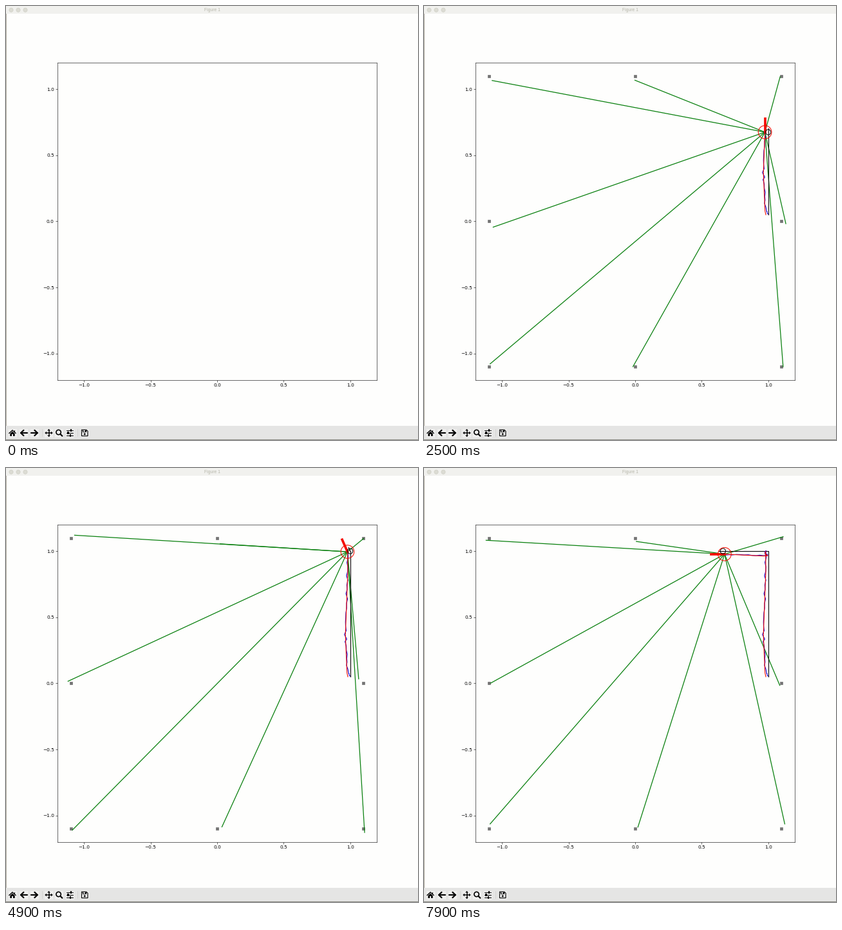
A matplotlib script that plays this animation: 640x674 px, repeating every 8 s.

```python
import matplotlib.pyplot as plt
import numpy as np
from matplotlib.animation import FuncAnimation
from matplotlib.collections import LineCollection
from matplotlib.patches import Circle, Ellipse, Polygon, Rectangle

W, H, DPI = 640, 674, 64
FRAMES, INTERVAL = 80, 100

PAPER, TITLE_BAR, TOOLBAR, CELL = "#fefefd", "#f1f1ee", "#e5e5e4", "#f0f0ef"
INK, GREEN, RED, BLUE = "#060606", "#0a800f", "#f50a00", "#1000d0"


def px(size):
    """Pixels to points."""
    return size * 72 / DPI


def pt(size):
    """Points of the 12 inch window content to points of this figure."""
    return size * 5 / 6


plt.rcParams["font.family"] = "DejaVu Sans"
fig = plt.figure(figsize=(W / DPI, H / DPI), dpi=DPI, facecolor=PAPER)


# Window frame and toolbar, in pixels with y pointing down
ui = fig.add_axes([0, 0, 1, 1])
ui.set(xlim=(0, W), ylim=(H, 0))
ui.axis("off")


def box(x0, y0, x1, y1, color=INK):
    ui.add_patch(Rectangle((x0, y0), x1 - x0, y1 - y0, fc=color, ec="none"))


def stroke(points, width, color=INK):
    x, y = zip(*points)
    ui.plot(x, y, color=color, lw=px(width), solid_capstyle="round",
            solid_joinstyle="round")


def shape(points):
    ui.add_patch(Polygon(points, fc=INK, ec="none"))


def disc(x, y, r, fill, edge, width):
    ui.add_patch(Circle((x, y), r, fc=fill, ec=edge, lw=px(width)))


def draw_window():
    box(0, 0, W, 12, TITLE_BAR)
    box(0, 652, W, H, TOOLBAR)
    box(0, 12, 1, 652, "#b4b0a4")
    box(0, H - 1, W, H, "#8c8c84")
    for x in (8, 19, 30):
        disc(x, 6.2, 3.1, "#dcdcd4", "#cdcdc2", 0.6)
    ui.text(320.5, 6.5, "Figure 1", family="Liberation Sans", size=px(6.8),
            color="#b8b8ac", ha="center", va="center")


def draw_toolbar():
    cy = 663
    for x in (10, 27.5, 44, 66.5, 82.5, 99, 122):
        box(x - 6.5, cy - 6.5, x + 6.5, cy + 6.5, CELL)
    for x in (55.5, 110.5):
        box(x, cy - 6, x + 1, cy + 6, "#d4d4d2")

    # home
    stroke([(4.8, 663.6), (10, 658.8), (15.2, 663.6)], 1.4)
    shape([(6.3, 664), (10, 660.6), (13.7, 664), (13.7, 668), (11, 668),
           (11, 665), (9, 665), (9, 668), (6.3, 668)])
    box(12.8, 658.8, 14.2, 662.2)

    # back and forward
    for tip, way in ((23, 1), (48.8, -1)):
        stroke([(tip, cy), (tip + 9.5 * way, cy)], 2.2)
        stroke([(tip + 4.4 * way, cy + dy) for dy in (-4.2, 0, 4.2)][:1]
               + [(tip, cy), (tip + 4.4 * way, cy + 4.2)], 2.2)

    # pan
    cx = 66.5
    for dx, dy in ((1, 0), (-1, 0), (0, 1), (0, -1)):
        stroke([(cx, cy), (cx + 4.5 * dx, cy + 4.5 * dy)], 1.5)
        shape([(cx + 6.2 * dx, cy + 6.2 * dy),
               (cx + 3.6 * dx + 2.4 * dy, cy + 3.6 * dy + 2.4 * dx),
               (cx + 3.6 * dx - 2.4 * dy, cy + 3.6 * dy - 2.4 * dx)])

    # zoom
    disc(81.6, 662, 3.7, "none", INK, 1.7)
    stroke([(84.8, 665.2), (87.4, 667.8)], 2.2)

    # sliders
    for y, knob in ((659, 101), (663, 96.5), (667, 100)):
        stroke([(94, y), (104, y)], 1.1)
        box(knob - 1.1, y - 1.7, knob + 1.1, y + 1.7)

    # save
    stroke([(117.5, 658.3), (125, 658.3), (127, 660.3), (127, 667.7),
            (117.5, 667.7), (117.5, 658.3)], 1.2)
    box(119, 658.3, 124.5, 661.8)
    box(120.2, 659.2, 123.3, 660.7, CELL)
    disc(122.2, 664.8, 1.5, INK, "none", 0)


draw_window()
draw_toolbar()


# Plot area
ax = fig.add_axes([80 / W, (H - 580.8) / H, 496 / W, 492.8 / H], facecolor=PAPER)
ax.set(xlim=(-1.2, 1.2), ylim=(-1.2, 1.2))
ax.set_xticks(np.arange(-1, 1.1, 0.5))
ax.set_yticks(np.arange(-1, 1.1, 0.5))
ax.tick_params(labelsize=pt(10), length=pt(3.5), pad=pt(3.5), width=pt(0.8),
               color=INK, labelcolor=INK)
for spine in ax.spines.values():
    spine.set(linewidth=pt(0.8), edgecolor=INK)


# Simulation: one step per frame, apart from a few stalls
STALLS = (26, 27, 36, 37, 41, 42, 43, 46, 47, 48, 58)
step_of = np.cumsum([f > 0 and f not in STALLS for f in range(FRAMES)])
steps = np.arange(step_of[-1] + 1)


def track(*keys):
    """Piecewise linear value per step from (step, value) pairs."""
    at, value = zip(*keys)
    return np.interp(steps, at, value)


# Drive up, turn left on the spot, drive left
true_x = track((56.8, 1), (68, 0.66))
true_y = track((1, 0.05), (6, 0.08), (16, 0.366), (34.5, 1))
heading = np.radians(track((33, 90), (56, 180)))

rng = np.random.default_rng(4)


def noise(sigma, *shape):
    return rng.normal(0, sigma, (len(steps), *shape))


# The filtered estimate drifts slowly, the raw one jitters around it
est_x = true_x + track((1, -0.018), (16, -0.036), (30, -0.018), (48, -0.023),
                       (58, 0), (68, 0.012))
est_y = true_y + track((36, 0), (58, -0.037), (68, -0.023))
start_gap = 0.017 * np.exp((0.05 - true_y) / 0.07)
raw_x = est_x + start_gap + noise(0.004) * (true_y > 0.1)
raw_y = est_y + noise(0.003)

landmarks = np.array([(x, y) for y in (1.1, 0, -1.1) for x in (-1.1, 0, 1.1)
                      if x or y])
sightings = landmarks + np.clip(noise(0.024, 8, 2), -0.045, 0.045)


# Moving parts
def line(color, width=1.5, **style):
    return ax.plot([], [], color=color, lw=pt(width), **style)[0]


def ellipse(size, color):
    return ax.add_patch(Ellipse((0, 0), size, size, fc="none", ec=color,
                                lw=pt(1.4), zorder=3))


marks = line("#747474", marker="s", ls="none", ms=pt(6), mew=pt(1))
rays = ax.add_collection(LineCollection([], colors=GREEN, linewidths=pt(1.7), zorder=2))
true_trail = line(INK)
raw_trail = line(BLUE)
est_trail = line(RED)
true_nose = line(INK)
est_nose = line(RED, 5)
true_body = ellipse(0.04, INK)
est_body = ellipse(0.1, RED)
parts = [marks, rays, true_trail, raw_trail, est_trail, true_nose, est_nose,
         true_body, est_body]


def point(nose, x, y, angle, length):
    nose.set_data([x, x + length * np.cos(angle)], [y, y + length * np.sin(angle)])


def update(frame):
    s = step_of[frame]
    for part in parts:
        part.set_visible(s > 0)
    past = slice(1, s + 1)
    here = (est_x[s], est_y[s])
    marks.set_data(*landmarks.T)
    rays.set_segments([(here, end) for end in sightings[s]])
    true_trail.set_data(true_x[past], true_y[past])
    raw_trail.set_data(raw_x[past], raw_y[past])
    est_trail.set_data(est_x[past], est_y[past])
    true_body.center = (true_x[s], true_y[s])
    est_body.center = here
    point(true_nose, true_x[s], true_y[s], heading[s], 0.03)
    point(est_nose, *here, heading[s], 0.1)
    return parts


anim = FuncAnimation(fig, update, frames=FRAMES, interval=INTERVAL,
                     repeat=True, repeat_delay=0, blit=False)
plt.show()
```
